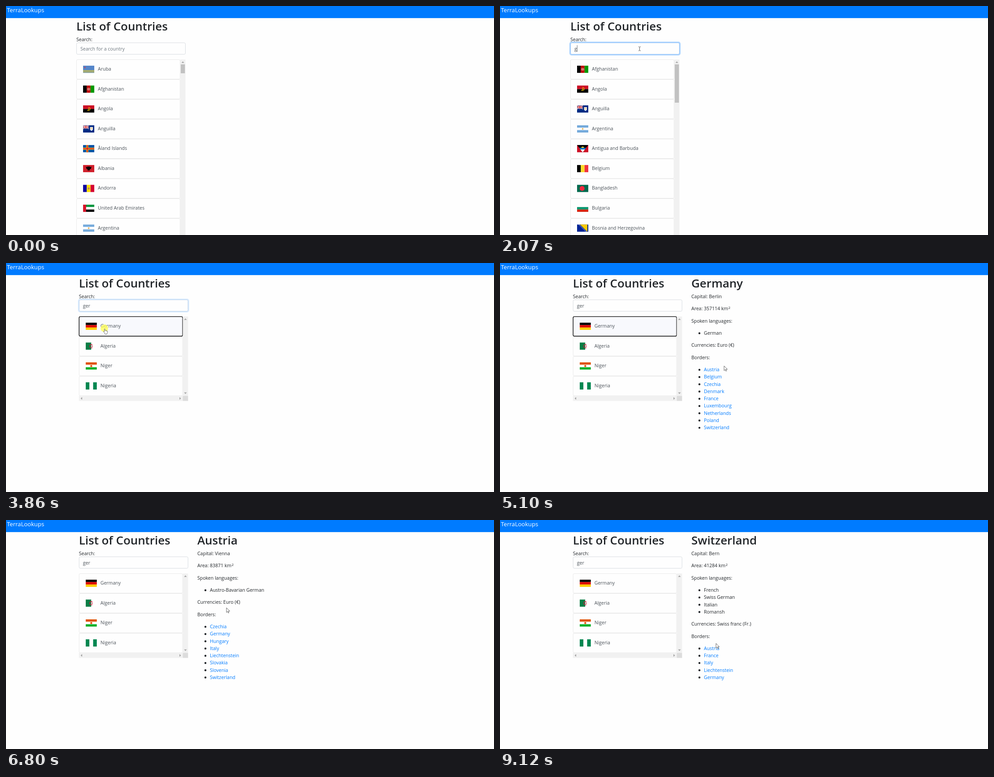
Animation of 1089x514 px, one loop 9200 ms. Source, as an HTML page:

```html
<!DOCTYPE html>
<html lang="en">
<head>
<meta charset="utf-8">
<title>List of Countries</title>
<style>
html, body { margin: 0; width: 100%; height: 100%; overflow: hidden; background: #fefefe; }
svg#stage { display: block; width: 100%; height: 100%; }
text { font: 10.5px "Open Sans", "Noto Sans", sans-serif; fill: #212529; white-space: pre; }
.brand { font-size: 13.1px; fill: #fff; }
.title { font-size: 25.9px; font-weight: 600; }
.item, .typed { fill: #495057; }
.hint { fill: #6c757d; }
.link { fill: #007bff; }
.link.hover { fill: #0056b3; text-decoration: underline; }
.row { fill: #fefefe; stroke: #000; stroke-opacity: .125; stroke-width: .7; }
.row.hover { fill: #f8f9fa; }
.row.focus { fill: #f8f9fd; stroke-opacity: 1; stroke-width: 1.4; }
</style>
</head>
<body>
<svg id="stage" viewBox="0 0 1089 514">
  <rect width="1089" height="27.15" fill="#007bff"/>
  <text class="brand" x="2" y="14">TerraLookups</text>
  <g id="list"></g>
  <g id="field">
    <rect x=".4" y="82.6" width="243" height="25.8" rx="2.7" fill="#fefefe" stroke="#ced4da" stroke-width=".8"/>
    <g id="glow" fill="none">
      <rect x="-1" y="81.2" width="245.8" height="28.6" rx="3.6" stroke="#007bff" stroke-opacity=".3" stroke-width="2.4"/>
      <rect x=".4" y="82.6" width="243" height="25.8" rx="2.7" stroke="#80bdff" stroke-width=".8"/>
    </g>
    <text id="query" x="9" y="100"></text>
    <rect id="caret" y="88" width=".8" height="15" fill="#495057"/>
  </g>
  <g id="detail"></g>
  <g id="pointer">
    <circle id="halo" cx="-.5" cy="-.5" r="8.5" fill="#ffff5a" fill-opacity=".8"/>
    <path id="arrow" transform="scale(.62)" fill="#fff" stroke="#222" stroke-width="1.1" d="M0 0V17L4 13.2 6.5 19 9 18 6.5 12.2H12Z"/>
    <path id="hand" transform="translate(-3 0) scale(.6)" fill="#fff" stroke="#333" stroke-width="1.1" stroke-linejoin="round"
      d="M4 12V2Q5.5-.5 7 2V8L9.5 7 10 9 12.5 8 13 10 15.5 9.5 16 11V15L14 18V21H6V18L1 12Q1 9.5 4 12Z"/>
    <path id="beam" fill="none" stroke="#444" stroke-width=".9" d="M-2.5-4.5Q0-4.5 0-3.5 0-4.5 2.5-4.5M0-3.5V3.5M-2.5 4.5Q0 4.5 0 3.5 0 4.5 2.5 4.5"/>
  </g>
</svg>
<script>
const LOOP = 9200, ROW = 44.57;
const $ = id => document.getElementById(id);

// Shape helpers
const box = (c, x, y, w, h) => `<rect x="${x}" y="${y}" width="${w}" height="${h}" fill="${c}"/>`;
const dot = (c, x, y, r) => `<circle cx="${x}" cy="${y}" r="${r}" fill="${c}"/>`;
const poly = (c, pts) => `<polygon points="${pts}" fill="${c}"/>`;
const line = (c, w, d) => `<path d="${d}" stroke="${c}" stroke-width="${w}" fill="none"/>`;
const text = (cls, x, y, s) => `<text class="${cls}" x="${x}" y="${y}">${s}</text>`;

// Flags on a 24 by 16 field
const bands = (...cs) => cs.map((c, i) => box(c, 0, i * 16 / cs.length, 24, 16 / cs.length)).join('');
const pales = (...cs) => cs.map((c, i) => box(c, i * 24 / cs.length, 0, 24 / cs.length, 16)).join('');
const ring = (c, x, y, r) => `<circle cx="${x}" cy="${y}" r="${r}" fill="none" stroke="${c}" stroke-width=".8"/>`;
const ensign = box('#012b83', 0, 0, 24, 16) +
  line('#fff', 1.8, 'M0 0L12 8M12 0L0 8') + line('#d22', .7, 'M0 0L12 8M12 0L0 8') +
  line('#fff', 2.6, 'M6 0V8M0 4H12') + line('#d22', 1.4, 'M6 0V8M0 4H12');
const cross = (c, w) => line(c, w, 'M9 0V16M0 8H24');
const plus = (x, y) => line('#e22', .9, `M${x - 1.5} ${y}h3M${x} ${y - 1.5}v3`);

// A bar in a name marks a line break
const countries = {
  'Aruba': box('#5485c9', 0, 0, 24, 16) + box('#f9d616', 0, 10.2, 24, 1.3) + box('#f9d616', 0, 13, 24, 1.3) +
    poly('#c8405a', '4,1.5 4.7,3.3 6.5,4 4.7,4.7 4,6.5 3.3,4.7 1.5,4 3.3,3.3'),
  'Afghanistan': pales('#000', '#be0000', '#090') + ring('#eed', 12, 8, 2.6) + box('#eed', 11, 7, 2, 2),
  'Angola': bands('#cc1126', '#000') + line('#fc0', 1, 'M11 4.5A3.4 3.4 0 1 1 10 10.5M9 11.5L14 8') + dot('#fc0', 11.5, 7.3, 1),
  'Anguilla': ensign + box('#fff', 15, 4, 6, 6) + poly('#fff', '15,10 21,10 18,12.5') + ring('#f9a030', 18, 7, 1.6),
  'Åland Islands': box('#0053a5', 0, 0, 24, 16) + cross('#ffce00', 4.4) + cross('#d21034', 2),
  'Albania': box('#d0202c', 0, 0, 24, 16) +
    poly('#000', '9.5,2.5 12,4.2 14.5,2.5 14,5 18,4 16.5,9 14,9 15,12 12.5,11.5 12,14 11.5,11.5 9,12 10,9 7.5,9 6,4 10,5'),
  'Andorra': pales('#10069f', '#fedd00', '#d50032') + dot('#c7a05c', 12, 8, 2.5) + dot('#d8525c', 12, 8, 1),
  'United Arab Emirates': bands('#00963f', '#fff', '#000') + box('#d7142a', 0, 0, 6.5, 16),
  'Argentina': bands('#75aadb', '#fff', '#75aadb') + dot('#e8b35a', 12, 8, 1.8),
  'Antigua and Barbuda': box('#ce1126', 0, 0, 24, 16) + poly('#000', '0,0 24,0 12,16') + dot('#fcd116', 12, 6.2, 3) +
    poly('#0072c6', '4.5,6 19.5,6 16.9,9.5 7.1,9.5') + poly('#fff', '7.1,9.5 16.9,9.5 12,16'),
  'Belgium': pales('#000', '#fdda25', '#ef3340'),
  'Bangladesh': box('#006a4e', 0, 0, 24, 16) + dot('#f42a41', 10.8, 8, 5.3),
  'Bulgaria': bands('#fff', '#00966e', '#d62612'),
  'Bosnia and Herzegovina': box('#002395', 0, 0, 24, 16) + poly('#fecb00', '6,0 22,0 22,16') +
    Array.from({length: 8}, (_, i) => dot('#fff', 4.5 + 2.1 * i, .8 + 2.1 * i, .75)).join(''),
  'Germany': bands('#000', '#d00', '#ffce00'),
  'Algeria': pales('#0a7d45', '#fff') + line('#d21034', 1.2, 'M14.5 5.2A3.6 3.6 0 1 0 14.5 10.8') + dot('#d21034', 14, 8, 1.2),
  'Georgia': box('#fff', 0, 0, 24, 16) + line('#e22', 3, 'M12 0V16M0 8H24') + plus(5, 3.2) + plus(19, 3.2) + plus(5, 12.8) + plus(19, 12.8),
  'Niger': bands('#e05206', '#fff', '#0db02b') + dot('#e05206', 12, 8, 2.2),
  'Nigeria': pales('#008751', '#fff', '#008751'),
  'South Georgia and the South|Sandwich Islands': ensign + dot('#cdd6c0', 18, 8, 3.2) + dot('#4a8a5c', 18, 8, 1.5)
};

const details = {
  Germany: { capital: 'Berlin', area: 357114, languages: ['German'], currency: 'Euro (€)',
    borders: ['Austria', 'Belgium', 'Czechia', 'Denmark', 'France', 'Luxembourg', 'Netherlands', 'Poland', 'Switzerland'] },
  Austria: { capital: 'Vienna', area: 83871, languages: ['Austro-Bavarian German'], currency: 'Euro (€)',
    borders: ['Czechia', 'Germany', 'Hungary', 'Italy', 'Liechtenstein', 'Slovakia', 'Slovenia', 'Switzerland'] },
  Switzerland: { capital: 'Bern', area: 41284, languages: ['French', 'Swiss German', 'Italian', 'Romansh'], currency: 'Swiss franc (Fr.)',
    borders: ['Austria', 'France', 'Italy', 'Liechtenstein', 'Germany'] }
};

// Timeline: [time, value]
const typing = [[0, ''], [2070, 'g'], [2150, 'ge'], [2370, 'ger']];
const pages = [[0, ''], [3940, 'Germany'], [6120, 'Austria'], [8430, 'Switzerland']];
const caretResets = [[0, 0], [1300, 1300], ...typing.slice(1).map(([t]) => [t, t])];
const clicks = [[1220, 1380], [3780, 3940], [5960, 6120], [8280, 8430]];

// Pointer legs: start, end, from, bend, to
const legs = [
  [130, 890, 971, 473, 560, 110, 311.5, 96],
  [3170, 3700, 311.5, 96, 260, 115, 220, 147],
  [4180, 5100, 220, 147, 660, -95, 500, 231],
  [5110, 5490, 500, 231, 492, 235, 484, 238],
  [6340, 6800, 484, 238, 488, 215, 492, 197],
  [6800, 7280, 492, 197, 500, 158, 508, 282],
  [7280, 7740, 508, 282, 505, 320, 487, 350],
  [7850, 7970, 487, 350, 486.5, 349.5, 486, 349],
  [8670, 9115, 486, 349, 490, 310, 482, 277]
];

const latest = (track, t) => track.filter(([at]) => at <= t).pop()[1];
const during = (t, a, b) => t >= a && t < b;
const clamp = v => Math.max(0, Math.min(1, v));

function pointerAt(t) {
  const [a, b, x0, y0, cx, cy, x1, y1] = legs.filter(l => l[0] <= t).pop() || legs[0];
  const p = clamp((t - a) / (b - a)), u = p * p * (3 - 2 * p), v = 1 - u;
  const bend = (s, c, e) => s * v * v + 2 * c * u * v + e * u * u;
  return [bend(x0, cx, x1), bend(y0, cy, y1)];
}

const tri = (x, y, turn) => `<path transform="translate(${x} ${y}) rotate(${turn})" d="M-3 1.7L0-1.7 3 1.7Z" fill="#a3a3a3"/>`;

function drawList(query) {
  const names = Object.keys(countries).filter(n => n.toLowerCase().includes(query));
  const short = query.length > 1;
  const end = short ? 120 + ROW * names.length : 530;
  let out = text('title', 0, 55, 'List of Countries') + text('', 0, 79, 'Search:');
  names.forEach((name, i) => {
    const y = 120 + ROW * i, lines = name.split('|');
    out += `<rect class="row" x=".35" y="${y + .35}" width="231" height="${ROW - .7}" rx="2.7"/>` +
      `<svg x="15" y="${y + 13.8}" width="25" height="16.5" viewBox="0 0 24 16" preserveAspectRatio="none">${countries[name]}</svg>` +
      lines.map((s, k) => text('item', 48, y + 25 + 16.27 * (k - (lines.length - 1) / 2), s)).join('');
  });
  out += box('#f1f1f1', 231.7, 120, 11.8, end - 120) + tri(237.6, 126, 0);
  if (short) {
    out += tri(237.6, end - 6, 180) + box('#f1f1f1', 0, end, 231.7, 11.3) + box('#dcdcdc', 231.7, end, 11.8, 11.3) +
      tri(5.5, end + 5.6, -90) + tri(226, end + 5.6, 90);
  } else {
    out += box('#c1c1c1', 233, 131, 9.3, query ? 86 : 20);
  }
  const shift = `translate(${short ? 162.8 : 157} 0)`;
  $('list').innerHTML = out;
  $('list').setAttribute('transform', shift);
  $('field').setAttribute('transform', shift);
  $('query').textContent = query || 'Search for a country';
  $('query').setAttribute('class', query ? 'typed' : 'hint');
  $('caret').setAttribute('x', 9 + (query ? $('query').getComputedTextLength() : 0));
}

function drawDetail(name) {
  if (!name) return $('detail').innerHTML = '';
  const d = details[name];
  let y = 79, out = text('title', 427, 55, name);
  const para = s => { out += text('', 427, y, s); y += 27.35; };
  const bullets = (items, cls) => {
    for (const s of items) {
      out += dot('#212529', 445, y - 3.4, 2.2) + text(cls, 455, y, s);
      y += 16.27;
    }
    y += 11.05;
  };
  para('Capital: ' + d.capital);
  para(`Area: ${d.area} km<tspan dx=".5" dy="-3.6" style="font-size:8px">2</tspan>`);
  para('Spoken languages:');
  bullets(d.languages, '');
  para('Currencies: ' + d.currency);
  para('Borders:');
  bullets(d.borders, 'link');
  $('detail').innerHTML = out;
}

const show = (id, on) => $(id).style.display = on ? '' : 'none';
let shownQuery, shownPage;

function render(t) {
  const query = latest(typing, t), page = latest(pages, t);
  if (query !== shownQuery) drawList(shownQuery = query);
  if (page !== shownPage) drawDetail(shownPage = page);

  $('glow').style.opacity = clamp((t - 1190) / 150) * (1 - clamp((t - 3780) / 150));
  show('caret', during(t, 1300, 3780) && (t - latest(caretResets, t)) % 1080 < 540);

  const [x, y] = pointerAt(t), moving = t >= 130;
  let hot = false;
  const hover = el => {
    const r = el.getBoundingClientRect();
    const on = moving && x >= r.left && x <= r.right && y >= r.top && y <= r.bottom;
    el.classList.toggle('hover', on);
    hot = hot || on;
  };
  document.querySelectorAll('.row, .link').forEach(hover);
  document.querySelector('.row').classList.toggle('focus', during(t, 3780, 5960));

  const inField = during(x, 157, 406) && during(y, 82, 109);
  show('pointer', moving);
  show('halo', clicks.some(([a, b]) => during(t, a, b)));
  show('beam', inField);
  show('hand', hot && !inField);
  show('arrow', !hot && !inField);
  $('pointer').setAttribute('transform', `translate(${x} ${y})`);
}

const start = performance.now();
function tick() {
  render((performance.now() - start) % LOOP);
  requestAnimationFrame(tick);
}
tick();
</script>
</body>
</html>
```
